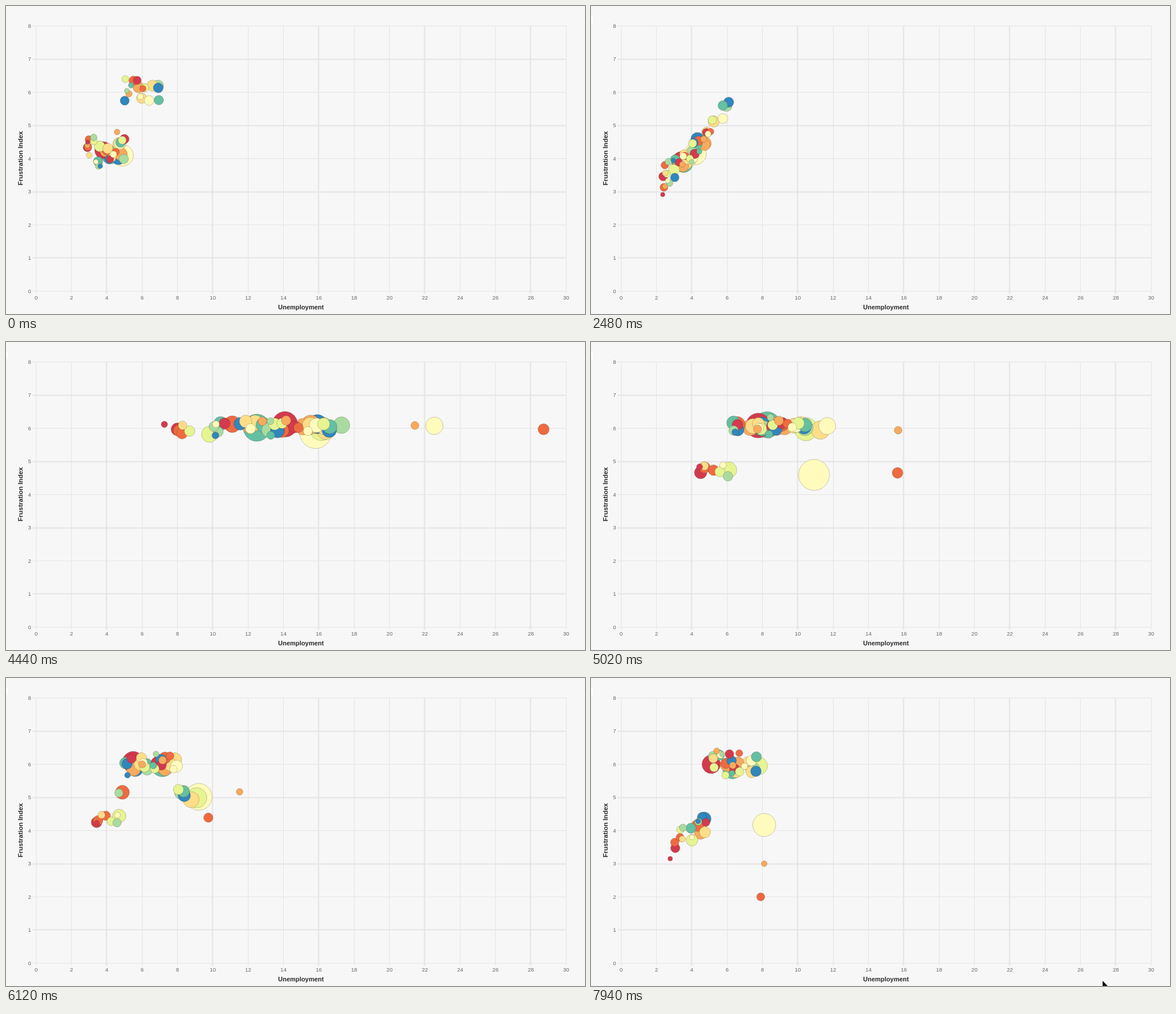
Recreate the animation shown at these times as an HTML page with a canvas. Size 1005 px wide and 534 px high, loop 7990 ms.

```html
<!DOCTYPE html>
<html lang="en">
<head>
<meta charset="utf-8">
<title>Frustration Index by Unemployment</title>
<style>
  html, body { margin: 0; width: 100%; height: 100%; overflow: hidden; background: #f7f7f7; }
  canvas { display: block; width: 1005px; height: 534px; }
</style>
</head>
<body>
<canvas id="chart"></canvas>
<script>
const W = 1005, H = 534, LOOP = 7990;
const START = 480, STEP = 750, COUNT = 51;
const COLORS = ['#d33a4d', '#ef6a40', '#f7aa5e', '#fddd88', '#fffbbd', '#e6f492', '#a9dba1', '#65bfa2', '#3186bd'];
const FONT = '"Liberation Sans", Arial, sans-serif';

let seed = 7;
const rand = () => (seed = seed * 16807 % 2147483647) / 2147483647;
const spread = size => (rand() * 2 - 1) * size;

// Quarters: range of x, its skew, index below and above 5 % (tilted by slope), bubble scale.
// Beyond cap the index falls back to the low level.
const quarters = [
  { lo: 2.9, hi: 6.8, skew: 1.5, low: 4.25, high: 6.05, scale: .93 },
  { lo: 2.3, hi: 5.8, skew: 1.5, low: 4.1, high: 5.4, slope: .6, scale: .95 },
  { lo: 2.8, hi: 6.7, skew: 1.4, low: 4.3, high: 6.05, scale: 1.1 },
  { lo: 7.4, hi: 17.7, low: 4.2, high: 6.05, scale: 1.39 },
  { lo: 3.2, hi: 8.8, low: 4.3, high: 6.05, scale: 1.33 },
  { lo: 3, hi: 8.3, low: 4.3, high: 5.95, cap: 7.9, scale: 1.03 },
  { lo: 2.5, hi: 7.6, low: 3.9, high: 6, slope: .3, scale: 1 }
];

// Leading bubbles: radius and path through the quarters; y only where it leaves the rule.
const leaders = {
  4: { r: 20, x: [4.9, 4.2, 5.1, 16.3, 9.4, 9.05, 8.1], y: [4.1, 4.2, 5.96, 6, 4.2, 5.66, 4.17] },
  9: { r: 16, x: [3.8, 3.35, 5, 14.7, 5.8, 5.25, 5.1] },
  11: { r: 5, x: [2.9, 2.45, 2.1, 22, 13.9, 9.65, 8.1], y: [4.4, 3.1, 2.7, 6.1, 5.9, 4.6, 3] },
  22: { r: 11, x: [4.75, 4, 3.9, 23.6, 8.3, 5.85, 4.6] },
  28: { r: 7, x: [4.5, 3.6, 4.1, 30, 11.6, 8.3, 7.9], y: [4.2, 4.1, 4.1, 6.1, 4.25, 4.5, 2] },
  30: { r: 12, x: [4.7, 3.6, 4.1, 16.9, 9.7, 8.05, 7.2] },
  32: { r: 15, x: [4.6, 3.8, 4.4, 16.7, 8.7, 9.4, 7.8] },
  35: { r: 12, x: [4.65, 4.3, 5.8, 16.7, 5.5, 5.7, 4.7] },
  38: { r: 12, x: [4.8, 4.7, 5.65, 16.2, 6.7, 7.7, 6] },
  43: { r: 17, x: [4.2, 3.5, 5.1, 12.9, 6.95, 7.3, 6.3] }
};

const bubbles = Array.from({ length: COUNT }, (_, i) => ({
  color: COLORS[i % 9],
  rank: i * 19 % COUNT / (COUNT - 1),
  r: 4 + 7 * rand(),
  ...leaders[i]
}));

// Small bubbles stand for few answers, so they scatter more.
function place(b, q, n) {
  const { lo, hi, low, high, scale, skew = 1, slope = 0, cap = Infinity } = q;
  const u = Math.abs(b.rank + spread(.07));
  const x = b.x ? b.x[n] : lo + (hi - lo) * u ** skew;
  const level = x > 5 && x < cap ? high : low + slope * (Math.min(x, 5) - 3.8);
  const noise = spread(2.6 / (b.r * scale ** 2));
  return { x, y: b.y ? b.y[n] : level + noise, r: b.r * scale };
}

const lerp = (a, b, k) => a + (b - a) * k;
const mix = (p, q, k) => p.map((a, i) => ({
  x: lerp(a.x, q[i].x, k), y: lerp(a.y, q[i].y, k), r: lerp(a.r, q[i].r, k)
}));
const drift = (p, q, k) => mix(p, q, k).map(a => ({ ...a, x: a.x + spread(.2), y: a.y + spread(.4) }));

const [opening, autumn, winter, peak, relief, thaw, closing] =
  quarters.map((q, n) => bubbles.map(b => place(b, q, n)));
const poses = [
  opening, drift(opening, autumn, .35), drift(opening, autumn, .7), autumn, winter,
  peak, mix(peak, relief, .78), relief, thaw, closing];

const order = bubbles.map((b, i) => i).sort((a, b) => bubbles[b].r - bubbles[a].r);
const ease = t => t < .5 ? 4 * t ** 3 : 1 - 4 * (1 - t) ** 3;
const px = v => 52.3 + v * 30.667;
const py = v => 494.3 - v * 57.43;

const canvas = document.getElementById('chart');
const ctx = canvas.getContext('2d');
const dpr = window.devicePixelRatio || 1;
canvas.width = W * dpr;
canvas.height = H * dpr;

function label(text, x, y, font, color, align) {
  ctx.font = font + ' ' + FONT;
  ctx.fillStyle = color;
  ctx.textAlign = align;
  ctx.fillText(text, x, y);
}

function drawAxes() {
  ctx.fillStyle = '#e4e4e4';
  for (let v = 0; v <= 30; v += 2) {
    const wide = v % 6 === 4;
    ctx.fillRect(Math.floor(px(v)) - (wide ? .5 : 0), 35, wide ? 2 : 1, 464);
  }
  for (let v = 0; v <= 8; v++) {
    const wide = v % 2;
    ctx.fillRect(46, Math.floor(py(v)) - (wide ? .5 : 0), 927, wide ? 2 : 1);
  }
  for (let v = 0; v <= 30; v += 2) label(v, px(v), 509, '9.5px', '#666', 'center');
  for (let v = 0; v <= 8; v++) label(v, 43.5, py(v) + 3.2, '9.5px', '#666', 'right');
  label('Unemployment', 512, 526, 'bold 11px', '#2b2b2b', 'center');
  ctx.save();
  ctx.translate(29, 264);
  ctx.rotate(-Math.PI / 2);
  label('Frustration Index', 0, 0, 'bold 11.5px', '#2b2b2b', 'center');
  ctx.restore();
}

function drawBubbles(t) {
  const last = poses.length - 1;
  const p = Math.min(Math.max((t - START) / STEP, 0), last);
  const n = Math.min(Math.floor(p), last - 1);
  const now = mix(poses[n], poses[n + 1], ease(p - n));
  ctx.lineWidth = 1;
  ctx.strokeStyle = 'rgba(60,50,20,.25)';
  for (const i of order) {
    ctx.beginPath();
    ctx.arc(px(now[i].x), py(now[i].y), now[i].r, 0, 2 * Math.PI);
    ctx.fillStyle = bubbles[i].color;
    ctx.fill();
    ctx.stroke();
  }
}

const arrow = new Path2D('M0 0V13L3 10.2 5 15 7.2 14 5.2 9.4H9.3Z');
const glide = (t, from, to) => Math.min(Math.max((t - from) / (to - from), 0), 1);

function drawCursor(t) {
  if (t < 7480) return;
  const a = glide(t, 7480, 7640), b = glide(t, 7780, 7940);
  ctx.save();
  ctx.translate(466 + 377 * a + 45 * b, 319 + 144 * a + 62 * b);
  ctx.strokeStyle = '#fff';
  ctx.lineWidth = 1.5;
  ctx.stroke(arrow);
  ctx.fillStyle = '#000';
  ctx.fill(arrow);
  ctx.restore();
}

function draw() {
  const t = performance.now() % LOOP;
  ctx.setTransform(dpr, 0, 0, dpr, 0, 0);
  ctx.fillStyle = '#f7f7f7';
  ctx.fillRect(0, 0, W, H);
  if (t >= 500) {
    ctx.fillStyle = '#fff';
    ctx.fillRect(0, 17, 3, 12);
  }
  drawAxes();
  drawBubbles(t);
  drawCursor(t);
  requestAnimationFrame(draw);
}
draw();
</script>
</body>
</html>
```
